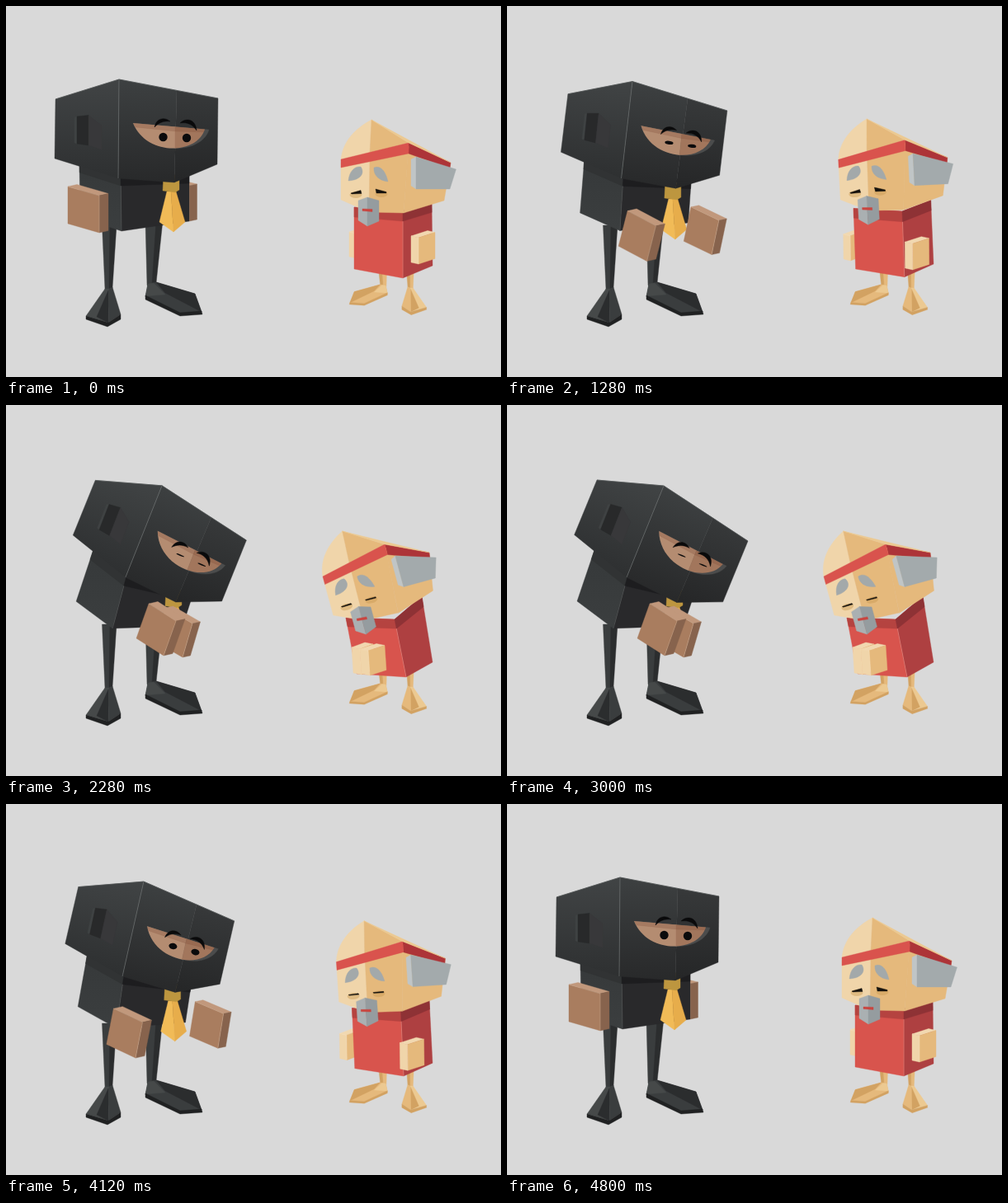
Write an HTML page with a canvas that moves like this. It is 600 px wide and 450 px high and loops after 4.84 s.

```html
<!DOCTYPE html>
<html lang="en">
<head>
<meta charset="utf-8">
<title>Two bows</title>
<style>
html, body { margin: 0; width: 100%; height: 100%; overflow: hidden; background: #d9d9d9; }
canvas { display: block; }
</style>
</head>
<body>
<canvas id="stage" width="600" height="450"></canvas>
<script>
const ctx = document.getElementById('stage').getContext('2d');
const LOOP = 4840;

// ---- Motion ----
const clamp = x => Math.max(0, Math.min(1, x));
const smooth = x => x * x * (3 - 2 * x);
// Smooth 0 to 1 between two times; a power below 1 starts faster and settles longer.
const ease = (t, from, to, power = 1) => smooth(clamp((t - from) / (to - from)) ** power);
// Smooth 0 to 1 and back to 0.
const bump = (t, from, to) => Math.sin(Math.PI * clamp((t - from) / (to - from))) ** 2;

// ---- Geometry ----
const pairs = a => Array.from({ length: a.length / 2 }, (_, i) => [a[2 * i], a[2 * i + 1]]);
const lerp = (a, b, f) => [a[0] + (b[0] - a[0]) * f, a[1] + (b[1] - a[1]) * f];
const move = (p, from, to) => [p[0] + to[0] - from[0], p[1] + to[1] - from[1]];

// Points between standing and bowed, swung aside by (dx, dy) halfway.
function blend([stand, bow], u, dx = 0, dy = 0) {
  const arc = 4 * u * (1 - u), end = pairs(bow);
  return pairs(stand).map((p, i) => {
    const [x, y] = lerp(p, end[i], u);
    return [x + dx * arc, y + dy * arc];
  });
}

// ---- Drawing ----
function paint(path, color, top, bottom) {
  let fill = color;
  if (Array.isArray(color)) {
    fill = ctx.createLinearGradient(0, top, 0, bottom);
    color.forEach((c, i) => fill.addColorStop(i, c));
  }
  ctx.fillStyle = ctx.strokeStyle = fill;
  ctx.lineWidth = .4;
  ctx.fill(path);
  ctx.stroke(path);
}

function poly(color, points) {
  const path = new Path2D(), ys = points.map(p => p[1]);
  points.forEach(p => path.lineTo(...p));
  path.closePath();
  paint(path, color, Math.min(...ys), Math.max(...ys));
}
const flat = (color, ...nums) => poly(color, pairs(nums));
const curve = (color, d) => paint(new Path2D(d), color);

function line(color, a, b) {
  ctx.strokeStyle = color;
  ctx.lineWidth = .7;
  ctx.beginPath();
  ctx.moveTo(...a);
  ctx.lineTo(...b);
  ctx.stroke();
}

function oval(color, x, y, rx, ry) {
  ctx.fillStyle = color;
  ctx.beginPath();
  ctx.ellipse(x, y, rx, ry, 0, 0, 7);
  ctx.fill();
}

function shifted(x, y, draw, sx = 1, sy = sx) {
  ctx.save();
  ctx.translate(x, y);
  ctx.scale(sx, sy);
  draw();
  ctx.restore();
}

// Draw in standing coordinates, mapped so that triangle a lands on b.
function warp(a, b, draw) {
  const sub = (p, q) => [p[0] - q[0], p[1] - q[1]];
  const u = sub(a[1], a[0]), v = sub(a[2], a[0]);
  const p = sub(b[1], b[0]), q = sub(b[2], b[0]);
  const det = u[0] * v[1] - u[1] * v[0];
  const col = i => [(p[i] * v[1] - q[i] * u[1]) / det, (q[i] * u[0] - p[i] * v[0]) / det];
  const [xa, xc] = col(0), [ya, yc] = col(1);
  ctx.save();
  ctx.transform(xa, ya, xc, yc,
    b[0][0] - xa * a[0][0] - xc * a[0][1], b[0][1] - ya * a[0][0] - yc * a[0][1]);
  draw();
  ctx.restore();
}

// ---- Shared body parts ----
function box([tl, tr, bl], dx, dy, [front, top, side]) {
  const br = move(tr, tl, bl);
  const back = p => [p[0] + dx, p[1] + dy];
  poly(top, [tl, back(tl), back(tr), tr]);
  poly(side, [tr, back(tr), back(br), br]);
  poly(front, [tl, tr, br, bl]);
  line('rgba(255,235,210,.3)', tl, tr);
  line('rgba(255,235,210,.3)', tr, br);
}

function torso([a, b, c, d, e, f], [left, right, shadeLeft, shadeRight, edge], depth) {
  const a2 = lerp(a, d, depth), b2 = lerp(b, e, depth), c2 = lerp(c, f, depth);
  poly(left, [a, b, e, d]);
  poly(right, [b, c, f, e]);
  poly(shadeLeft, [a, b, b2, a2]);
  poly(shadeRight, [b, c, c2, b2]);
  line(edge, b2, e);
}

// Both legs are drawn around the ankle.
function frontLeg([light, mid, dark, sole]) {
  flat(mid, -7.5, -77, 2, -77, 2, 0, -4, 1);
  flat(dark, 2, -77, 10, -77, 5, -1, 1, 0);
  flat(light, -4, 0, 2, 0, 0, 41, -27, 33);
  flat(dark, 0, 2, -14, 34, 0, 41);
  flat(mid, 1, 0, 5, -2, 15, 31, 0, 41);
  flat(sole, -27, 33, 0, 41, 15, 31, 15, 37, -1, 46, -27, 37);
}

function sideLeg([light, mid, dark, sole]) {
  flat(mid, -8, -75, 6, -75, 1, 1, -6, 2);
  flat(dark, 5, -77, 13, -77, 5, -1, 0, 1);
  flat(mid, -5, 0, 5, -2, 52, 12, 60, 34, 34, 36, -8, 16);
  flat(dark, 5, -2, 52, 12, 60, 34, 16, 11);
  flat(light, -5, 0, 2, -1, 16, 13, -8, 15);
  flat(sole, -8, 14, 34, 35, 60, 33, 61, 37, 34, 39, -8, 19);
}

// ---- Ninja ----
const NINJA = {
  head: [[60, 113, 137, 89, 257, 112, 136, 209], [109, 91, 190, 98, 292, 165, 145, 209]],
  body: [[89, 190, 139, 206, 222, 205, 90, 256, 140, 273, 222, 261],
    [106, 176, 146, 208, 226, 232, 85, 238, 129, 271, 214, 268]],
  left: [[75, 219, 113, 230, 75, 264], [173, 241, 206, 262, 158, 283]],
  right: [[186, 209, 222, 218, 186, 252], [193, 246, 226, 265, 181, 287]],
  legs: ['#464949', '#3a3d3e', '#2b2d2e', '#202122'],
  coat: [['#36393a', '#3b3e3f'], '#29292b', '#313334', '#1d1d1f', '#515454'],
  hands: ['#a97d5f', '#c1987c', '#87634d']
};

function ninjaEar() {
  flat(['#414445', '#2e3031'], 60, 113, 137, 89, 136, 209, 59, 185);
  flat('#3f4243', 83, 135, 86, 134, 86, 167, 83, 166);
  flat('#28292a', 86, 134, 100, 132.5, 100, 169, 86, 167);
  flat('#38383a', 100, 132.5, 116, 145, 116, 174, 100, 169);
}

function ninjaFace(u, shut) {
  flat(['#3d4041', '#28292a'], 137, 89, 207, 102.4, 204, 214, 136, 209);
  flat(['#37393a', '#252627'], 207, 102.4, 257, 112, 256, 192, 204, 214);
  ctx.translate(-2 * u, 0);
  curve('#4b4c4c', 'M154 142L246 150C237 181 170 182 154 142Z');
  ctx.save();
  ctx.clip(new Path2D('M154 142L241 149.5C231 181 170 182 154 142Z'));
  flat('#b48c71', 150, 138, 205, 138, 205, 180, 150, 180);
  flat('#a2765c', 205, 138, 250, 138, 250, 180, 205, 180);
  flat('rgba(120,70,50,.25)', 154, 142, 246, 150, 246, 153, 205, 152, 157, 147);
  ctx.restore();
  const open = 5.2 * (1 - .85 * shut);
  oval('#0b0b0c', 190.5, 159, 5.2, open);
  oval('#0b0b0c', 219, 160, 5.2, open);
  ctx.translate(-3 * u, 2 * shut + 5 * u);
  curve('#0a0a0b', 'M180 147C182 136 192 134 199 140C190 139 185 142 180 147Z');
  curve('#0a0a0b', 'M211 142C218 135 230 137 231 151C226 143 219 141 211 142Z');
}

function tie() {
  flat('#f1bb57', 195, 225, 200, 225, 203, 274, 186, 262);
  flat('#e7ad4b', 200, 225, 206, 225, 217, 262, 203, 274);
  flat('#bd963f', 191, 205, 210, 205, 210, 223, 205, 226, 190, 224);
}

function ninja(t) {
  const rise = ease(t, 3760, 4550);
  const u = ease(t, 900, 2440, .75) - rise - .04 * bump(t, 660, 1100);
  const reach = ease(t, 860, 1600, .75) - rise;
  const shut = Math.max(bump(t, 460, 820), ease(t, 900, 1600, .75) - ease(t, 3760, 4340));
  const [back, top, side, foot] = blend(NINJA.head, u);
  const [back0, top0, side0, foot0] = pairs(NINJA.head[0]);
  const rightHand = () => box(blend(NINJA.right, reach, 40, 10), 9.5, -2, NINJA.hands);

  shifted(124, 343, () => frontLeg(NINJA.legs));
  shifted(177, 337, () => sideLeg(NINJA.legs));
  if (reach < .2) rightHand();
  torso(blend(NINJA.body, u), NINJA.coat, .18);
  shifted(3 * u, 11 * smooth(clamp(u * 2.4)) + 9 * u * u, tie);
  warp([back0, top0, foot0], [back, top, foot], ninjaEar);
  warp([top0, side0, foot0], [top, side, foot], () => ninjaFace(u, shut));
  line('#6c7070', top, foot);
  line('#525657', back, top);
  line('#525657', top, side);
  if (reach >= .2) rightHand();
  box(blend(NINJA.left, reach, 0, 17), 11, -2.5, NINJA.hands);
}

// ---- Elder ----
const SKIN = { light: '#f0d5aa', mid: '#e5b97c', pale: '#ecc991', dark: '#d2a262' };
const ELDER = {
  head: [[406, 186, 488, 166, 539, 190, 406, 236], [384, 208, 459, 169, 513, 179, 397, 256]],
  body: [[422, 244, 481, 248, 516, 238, 422, 319, 481, 330, 517, 315],
    [412, 258, 471, 260, 504, 232, 425, 326, 485, 330, 517, 312]],
  left: [[416, 274, 424, 276, 416, 304], [419, 294, 429, 296, 421, 325]],
  right: [[491, 279, 500, 281, 491, 311], [429, 296, 439, 298, 431, 326]],
  legs: [SKIN.pale, SKIN.mid, SKIN.dark, SKIN.dark],
  coat: ['#d8544d', '#ae4041', '#b54340', '#8e3235', '#e8857c'],
  hands: [SKIN.light, '#f1d8b0', SKIN.mid]
};

function elderSide() {
  flat(SKIN.mid, 488, 166, 539, 190, 531, 236, 482, 251);
  flat('#ad3438', 488, 166, 539, 190, 538, 197, 488, 179);
  flat('#c0c5c6', 491, 186, 497, 183, 497, 222, 491, 218);
  flat('#a3aaac', 497, 183, 545.5, 198, 538, 222, 497, 222);
}

function elderFront(shut) {
  curve(SKIN.light, 'M443 138C424 148 408 164 406 186L441 178Z');
  flat(SKIN.mid, 443, 138, 488, 166, 441, 178);
  flat(SKIN.light, 406, 190, 441, 182, 440, 250, 406, 235);
  flat(SKIN.mid, 441, 182, 488, 170, 482, 251, 440, 250);
  flat('#d9534d', 406, 186, 488, 166, 488, 179, 406, 196);
  curve('#a3a9aa', 'M415 212C416 200 423 194 430 195C435 202 431 211 415 212Z');
  curve('#a3a9aa', 'M446 196C454 193 460 200 463 213C452 212 445 205 446 196Z');
  oval('#dfbb82', 424, 229, 7.5, 4);
  oval('#d9ab69', 455, 228, 7.5, 4);
  const lid = 4 * (1 - shut);
  flat('#16120d', 418, 227, 430, 226 - lid * .6, 431, 227.5, 419, 228);
  flat('#16120d', 448, 226 - lid, 461, 225.5, 461, 227, 449, 227);
  flat('#aab0b2', 427, 236, 438, 232, 438, 267, 427, 260);
  flat('#959c9f', 438, 232, 452, 236, 452, 261, 438, 267);
  flat('#c9453f', 432, 246, 444, 246.5, 444, 249.5, 432, 248.5);
}

function elder(t) {
  const u = ease(t, 900, 2240) - ease(t, 2980, 4680);
  const reach = smooth(clamp(u * 1.2));
  const shut = ease(t, 1280, 1700) - ease(t, 4200, 4560);
  const lift = -4 * (ease(t, 300, 760) - ease(t, 1280, 1720));
  const [left, corner, right, jaw] = blend(ELDER.head, u);
  const [left0, corner0, right0, jaw0] = pairs(ELDER.head[0]);
  const leftHand = () => box(blend(ELDER.left, reach, -18), 16, -6, ELDER.hands);

  shifted(457, 339, () => sideLeg(ELDER.legs), -.67, .62);
  shifted(490.5, 342, () => frontLeg(ELDER.legs), -.71, .71);
  if (reach < .26) leftHand();
  shifted(0, lift / 3, () => torso(blend(ELDER.body, u), ELDER.coat, .16));
  shifted(0, lift, () => {
    warp([corner0, right0, move(corner0, left0, jaw0)],
      [corner, right, move(corner, left, jaw)], elderSide);
    warp([left0, corner0, jaw0], [left, corner, jaw], () => elderFront(shut));
    // The peak lies .45 along the band and .78 of a jaw height above it.
    const peak = move(lerp(left, corner, .45), lerp(left, jaw, .78), left);
    poly(SKIN.pale, [peak, right, corner]);
  });
  if (reach >= .26) leftHand();
  box(blend(ELDER.right, reach, 0, 10), 20, -6.5, ELDER.hands);
}

function frame() {
  const t = performance.now() % LOOP;
  ctx.fillStyle = '#d9d9d9';
  ctx.fillRect(0, 0, 600, 450);
  ninja(t);
  elder(t);
  requestAnimationFrame(frame);
}
frame();
</script>
</body>
</html>
```
